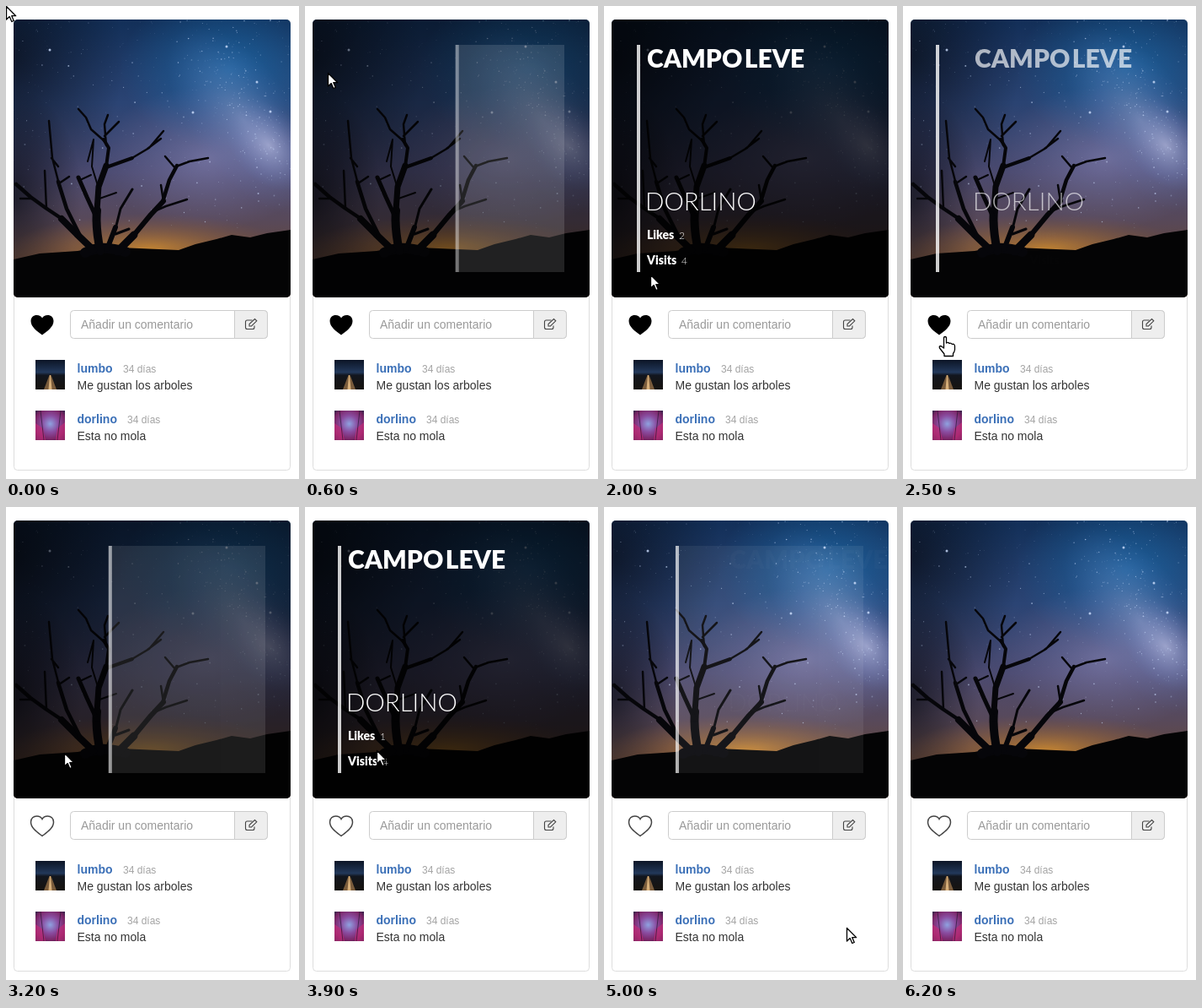
These frames come from a looping animation (348 px wide and 560 px high, 6400 ms). An HTML page:

```html
<!DOCTYPE html>
<html lang="es">
<head>
<meta charset="utf-8">
<title>Foto</title>
<style>
html, body { margin: 0; width: 100%; height: 100%; overflow: hidden; background: #fff; }
svg { display: block; font: 14px "Liberation Sans", Arial, sans-serif; }
.user { font-weight: bold; fill: #3a6fb7; }
.ago { font-size: 12px; fill: #a3a3a3; }
.msg { fill: #333; }
#caption { font-family: Lato, sans-serif; fill: #fff; }
.head { font-size: 30px; font-weight: 900; word-spacing: -.15em; }
.author { font-size: 29.5px; font-weight: 300; }
.stat { font-size: 14px; font-weight: 900; }
.count { font-size: 12px; font-weight: 300; }
#tree { fill: none; stroke: #06060a; stroke-linecap: round; stroke-linejoin: round; }
</style>
</head>
<body>
<svg width="348" height="560" viewBox="0 0 348 560">
  <defs>
    <linearGradient id="sky" x2="0" y2="1">
      <stop offset="0" stop-color="#122f58"/>
      <stop offset=".3" stop-color="#2b4474"/>
      <stop offset=".55" stop-color="#4b4a70"/>
      <stop offset=".72" stop-color="#58495a"/>
      <stop offset=".85" stop-color="#64483c"/>
    </linearGradient>
    <radialGradient id="blue"><stop stop-color="#1a74b8" stop-opacity=".65"/><stop offset="1" stop-color="#1a74b8" stop-opacity="0"/></radialGradient>
    <radialGradient id="haze"><stop stop-color="#9a96c8" stop-opacity=".5"/><stop offset="1" stop-color="#807cb0" stop-opacity="0"/></radialGradient>
    <radialGradient id="milk"><stop stop-color="#b9c0e6" stop-opacity=".65"/><stop offset=".5" stop-color="#8f9cd0" stop-opacity=".35"/><stop offset="1" stop-color="#6078b8" stop-opacity="0"/></radialGradient>
    <radialGradient id="glow"><stop stop-color="#dc9430" stop-opacity=".8"/><stop offset=".5" stop-color="#b07436" stop-opacity=".4"/><stop offset="1" stop-color="#8a5a40" stop-opacity="0"/></radialGradient>
    <radialGradient id="shade"><stop stop-color="#080a12" stop-opacity=".7"/><stop offset="1" stop-color="#080a12" stop-opacity="0"/></radialGradient>
    <linearGradient id="dusk" x2="0" y2="1"><stop stop-color="#0c1526"/><stop offset=".42" stop-color="#22385a"/><stop offset=".52" stop-color="#12161e"/><stop offset="1" stop-color="#17130f"/></linearGradient>
    <radialGradient id="neon" cy=".45" r=".7"><stop stop-color="#8fa2e0"/><stop offset=".4" stop-color="#8a4ca0"/><stop offset=".75" stop-color="#7a2464"/><stop offset="1" stop-color="#1c2040"/></radialGradient>
    <clipPath id="frame"><rect x="9" y="16" width="329" height="329" rx="5"/></clipPath>
  </defs>

  <rect x="9.5" y="16.5" width="328" height="533" rx="4" fill="#fff" stroke="#ddd"/>

  <g clip-path="url(#frame)">
    <rect x="9" y="16" width="329" height="329" fill="url(#sky)"/>
    <ellipse cx="265" cy="75" rx="130" ry="95" fill="url(#blue)"/>
    <ellipse cx="9" cy="60" rx="130" ry="190" fill="url(#shade)"/>
    <ellipse cx="5" cy="225" rx="85" ry="130" fill="url(#shade)"/>
    <ellipse cx="240" cy="180" rx="130" ry="85" fill="url(#haze)"/>
    <ellipse cx="282" cy="135" rx="130" ry="62" transform="rotate(54 282 135)" fill="url(#milk)" opacity=".6"/>
    <ellipse cx="312" cy="165" rx="62" ry="42" transform="rotate(48 312 165)" fill="url(#milk)"/>
    <ellipse cx="170" cy="288" rx="165" ry="42" fill="url(#glow)"/>
    <g id="stars" fill="#cfe0ff"></g>
    <path fill="#040405" d="M9 300L40 293 85 290 112 285 135 286 205 289 225 282 250 276 268 271 290 274 310 269 338 265V345H9Z"/>
    <g id="tree"></g>
    <rect id="dim" x="9" y="16" width="329" height="329"/>
    <g id="panel" fill="#fff">
      <rect id="pane" y="46" height="269"/>
      <rect id="bar" y="46" width="4" height="269" fill-opacity=".8"/>
    </g>
    <g id="caption">
      <g id="heading">
        <text class="head" x="51" y="73">CAMPO LEVE</text>
        <text class="author" x="49" y="242">DORLINO</text>
      </g>
      <g id="stats">
        <text class="stat" x="51" y="276">Likes</text><text id="likes" class="count" x="89" y="276"></text>
        <text class="stat" x="51" y="306">Visits</text><text class="count" x="92" y="306">4</text>
      </g>
    </g>
  </g>

  <path id="heart" stroke-width="1.5" d="M43 389.500C37 385 29.500 380 29.500 373C29.500 368.500 32.800 366 36.500 366C39.500 366 42 367.500 43 369.500C44 367.500 46.500 366 49.500 366C53.200 366 56.500 368.500 56.500 373C56.500 380 49 385 43 389.500Z"/>

  <rect x="76.5" y="360.5" width="234" height="33" rx="4" fill="#fff" stroke="#ccc"/>
  <path d="M271.5 360.5h35a4 4 0 0 1 4 4v25a4 4 0 0 1-4 4h-35Z" fill="#eee" stroke="#ccc"/>
  <text x="89" y="382" fill="#999">Añadir un comentario</text>
  <g fill="none" stroke="#444" stroke-width="1.1">
    <path d="M292.5 372h-6a2 2 0 0 0-2 2v6.500a2 2 0 0 0 2 2h6.500a2 2 0 0 0 2-2V378.500"/>
    <path d="M289 379v-2.500l6.500-6 2.300 2.300-6.300 6.200Z"/>
  </g>

  <g>
    <rect x="35" y="419" width="35" height="35" fill="url(#dusk)"/>
    <path d="M51.500 437h2L60 454H45Z" fill="#7a5c3c"/>
    <path d="M52 437h1l1.500 17h-4Z" fill="#d8b07a"/>
    <text class="user" x="84.5" y="434">lumbo</text><text class="ago" x="139" y="434">34 días</text>
    <text class="msg" x="84.5" y="454">Me gustan los arboles</text>
  </g>
  <g>
    <rect x="35" y="479" width="35" height="35" fill="url(#neon)"/>
    <path d="M35 494l9 6 3 14H35ZM70 493l-9 7-2 14h11Z" fill="#c22c78" opacity=".7"/>
    <path d="M41 479l4 35M65 479l-4 35" stroke="#2a1838" fill="none" opacity=".7"/>
    <text class="user" x="84.5" y="494">dorlino</text><text class="ago" x="144" y="494">34 días</text>
    <text class="msg" x="84.5" y="514">Esta no mola</text>
  </g>

  <g id="cursor" fill="#fff" stroke="#000" stroke-width="1.3" stroke-linejoin="round">
    <path id="arrow" d="M.5 .5V16L4.200 12.600 6.800 18.500 9.300 17.400 6.800 11.700H11.700Z"/>
    <path id="hand" d="M-1.500 1.500Q0-.5 1.500 1.500V8Q3.500 6.500 5 8.500Q7 7.500 8.300 9.500Q11 8.500 11.500 11.500V16Q11 19 9.500 20.500V23.500H-1V21L-6.500 14Q-7.500 11.500-5 11.500L-1.500 14Z"/>
  </g>
</svg>

<script>
const LOOP = 6400, STEP = 100, LIKE_CLICK = 2700, SLIDE = 100;
const hovers = [[445, 2140], [2985, 4333]];
const route = [
  [0, 0, 0], [300, 6, 8], [445, 14, 20], [1000, 60, 231], [1600, 64, 242],
  [2140, 52, 345], [2300, 48, 386], [2500, 50, 391], [2700, 45, 382], [2850, 46, 378],
  [2985, 56, 345], [3200, 69, 291], [3900, 85, 288], [4100, 92, 294],
  [4333, 130, 345], [5000, 288, 498], [5500, 300, 575], [LOOP, 300, 575]
];
const $ = id => document.getElementById(id);
const set = (id, attrs) => { for (const k in attrs) $(id).setAttribute(k, attrs[k]); };
const mix = (a, b, p) => a + (b - a) * p;

// CSS "ease": cubic-bezier(.25, .1, .25, 1)
function ease(x) {
  if (x <= 0) return 0;
  if (x >= 1) return 1;
  const curve = (a, b, s) => 3 * a * s * (1 - s) ** 2 + 3 * b * s * s * (1 - s) + s ** 3;
  let lo = 0, hi = 1;
  for (let i = 0; i < 24; i++) {
    const mid = (lo + hi) / 2;
    if (curve(.25, .25, mid) < x) lo = mid; else hi = mid;
  }
  return curve(.1, 1, lo);
}

function shown(t, delayIn, delayOut, length = 500) {
  return Math.max(...hovers.map(([enter, leave]) =>
    ease((t - enter - delayIn) / length) * (1 - ease((t - leave - delayOut) / length))));
}

function pointer(t) {
  const i = route.findIndex(p => p[0] > t);
  const [t0, x0, y0] = route[i - 1], [t1, x1, y1] = route[i];
  const p = (t - t0) / (t1 - t0);
  return [mix(x0, x1, p), mix(y0, y1, p)];
}

function drawStars() {
  let seed = 7, out = "";
  const rnd = () => (seed = seed * 16807 % 2147483647) / 2147483647;
  const star = (x, y, r, a) =>
    out += `<circle cx="${x.toFixed(1)}" cy="${y.toFixed(1)}" r="${r.toFixed(2)}" opacity="${a.toFixed(2)}"/>`;
  for (let i = 0; i < 320; i++) star(9 + rnd() * 329, 16 + rnd() ** 1.3 * 250, .3 + rnd() ** 4 * .7, .15 + rnd() * .5);
  for (let i = 0; i < 200; i++) {
    const along = rnd(), off = (rnd() + rnd() - 1) * 45;
    star(235 + along * 105 + off, 45 + along * 150 - off * .6, .3 + rnd() * .5, .2 + rnd() * .4);
  }
  for (const [x, y] of [[222, 126], [298, 90], [314, 125], [262, 48], [52, 52]]) star(x, y, 1.5, .8);
  $("stars").innerHTML = out;
}

function drawTree() {
  const limbs = [
    [12, "M94 292Q112 282 142 291"],
    [10, "M112 290Q106 262 108 242"], [7, "M108 242L110 214 119 189"],
    [4, "M119 190L122 168 116 158"], [2.5, "M117 160L101 146 95 132 86 122M119 165L117 140 121 129M117 154L134 137"],
    [4, "M119 191L150 180"], [2.5, "M148 181L170 168 187 148M168 169L184 157"],
    [5, "M108 252L96 226 86 203"], [2, "M88 206L101 200M110 216L102 190 104 158 97 184M111 228L131 221"],
    [8, "M104 289L84 270 66 252"], [4.5, "M68 253L47 239 29 226 12 211M88 272L72 240 62 208"],
    [2.5, "M63 211L55 180 51 136M63 210L75 202M48 240L46 195M30 228L17 228M54 180L62 190"],
    [6, "M120 288L130 262"], [3, "M130 264L136 240 150 217M130 270L146 264"],
    [9, "M132 291L152 271"], [6, "M152 271L172 247 187 231"],
    [4.5, "M186 232L194 206 203 189"], [2.5, "M202 190L218 184 240 180M201 192L189 178M176 243L190 237 215 229M187 231L184 212"]
  ];
  $("tree").innerHTML = limbs.map(([w, d]) => `<path stroke-width="${w}" d="${d}"/>`).join("");
}

function slideText(id, p) {
  set(id, { opacity: p, transform: `translate(${SLIDE * (1 - p)} 0)` });
}

function render(t) {
  const panel = shown(t, 0, 600), left = mix(338, 39, panel);
  set("dim", { opacity: .7 * shown(t, 0, 0, 450) });
  set("panel", { opacity: panel });
  set("pane", { x: left, width: Math.max(0, 308 - left), "fill-opacity": .5 * (1 - panel) });
  set("bar", { x: left });
  slideText("heading", shown(t, 300, 250));
  slideText("stats", shown(t, 500, 0, 400));

  const liked = t < LIKE_CLICK;
  set("heart", { fill: liked ? "#000" : "#fff", stroke: liked ? "none" : "#444" });
  $("likes").textContent = liked ? 2 : 1;

  const [x, y] = pointer(t);
  const onHeart = x < 62 && y > 362 && y < 396;
  set("cursor", { transform: `translate(${Math.round(x)} ${Math.round(y)})` });
  set("arrow", { visibility: onHeart ? "hidden" : "visible" });
  set("hand", { visibility: onHeart ? "visible" : "hidden" });
}

function tick() {
  const t = performance.now() % LOOP;
  render(Math.floor(t / STEP) * STEP);
  requestAnimationFrame(tick);
}

drawStars();
drawTree();
tick();
</script>
</body>
</html>
```
